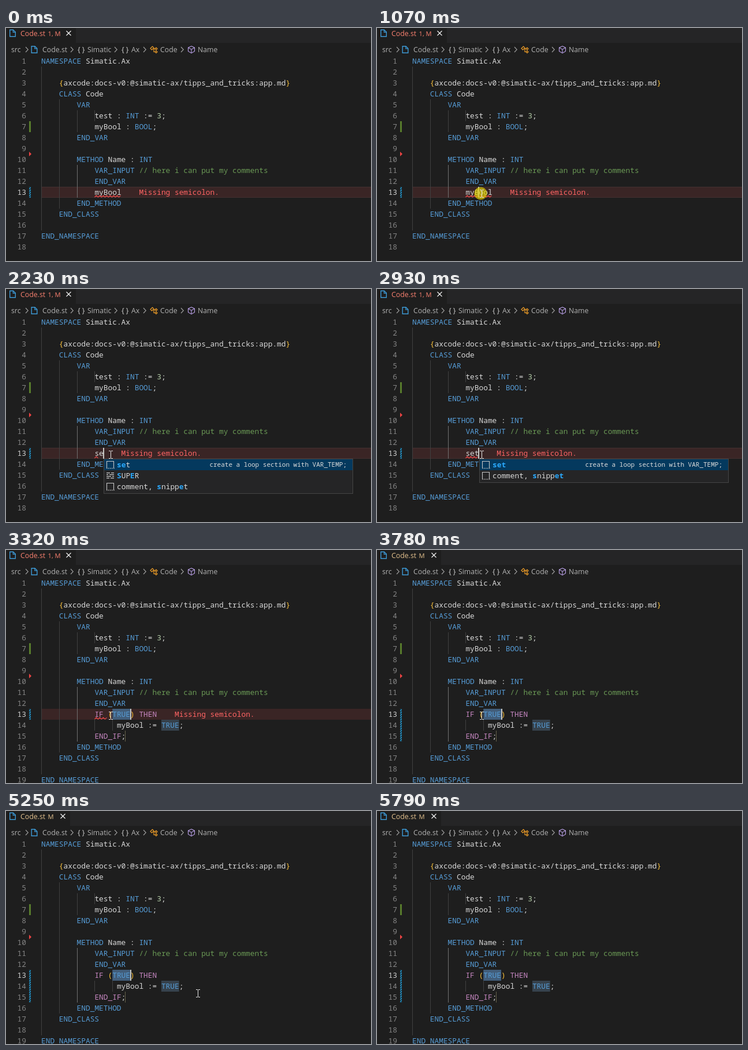
An HTML page with a canvas that plays this animation: 632 by 405 pixels, repeating every 6.27 s.

```html
<!DOCTYPE html>
<html lang="en">
<head>
<meta charset="utf-8">
<title>Editor snippet</title>
<style>
html, body { margin: 0; width: 100%; height: 100%; overflow: hidden; background: #1e1e1e; }
canvas { display: block; width: 632px; height: 405px; }
</style>
</head>
<body>
<canvas id="stage" width="632" height="405"></canvas>
<script>
const ctx = document.getElementById('stage').getContext('2d');
const LOOP = 6270, W = 632, H = 405, ROW = 19, CHAR = 7.7, LEFT = 61;
const MONO = '12.83px "Noto Sans Mono", monospace';
const MONO_BOLD = 'bold ' + MONO;
const DETAIL = '11px "Noto Sans Mono", monospace';
const UI = '12.3px "Open Sans", sans-serif';
const UI_SMALL = '11.2px "Open Sans", sans-serif';
const BLUE = '#569cd6', RED = '#f14c4c', TEXT = '#d8d8d8';

const colX = c => LEFT + c * CHAR;
const rowY = n => 48 + (n - 1) * ROW;

// Value of the last step that has begun
const at = (t, steps) => steps.reduce((v, s) => t >= s[0] ? s[1] : v, null);

const HEAD = [
  'NAMESPACE Simatic.Ax',
  '',
  '    {axcode:docs-v0:@simatic-ax/tipps_and_tricks:app.md}',
  '    CLASS Code',
  '        VAR',
  '            test : INT := 3;',
  '            myBool : BOOL;',
  '        END_VAR',
  '',
  '        METHOD Name : INT',
  '            VAR_INPUT // here i can put my comments',
  '            END_VAR'
];
const BODY = ['                 myBool := TRUE;', '            END_IF;'];
const TAIL = ['        END_METHOD', '    END_CLASS', '', 'END_NAMESPACE', ''];

const STEPS = {
  edit: [[0, 'myBool'], [2000, 's'], [2230, 'se'], [2460, 'set'], [3320, 'IF (TRUE) THEN']],
  caret: [[0, 0], [1070, 15], [1140, 18], [1680, 0], [2000, 13], [2230, 14], [2460, 15], [3010, 0],
    [3320, 20], [3850, 0], [4330, 20], [4790, 0], [5250, 20], [5790, 0]],
  query: [[0, ''], [2100, 's'], [2230, 'se'], [2460, 'set'], [3320, '']],
  wave: [[0, 6], [2000, 1], [2930, 3], [3700, 0]],
  click: [[0, false], [1070, true], [1140, false], [1220, true], [1300, false]],
  mouse: [[0, null], [300, [344, 374]], [380, [290, 365]], [460, [220, 350]], [530, [155, 330]],
    [610, [116, 312]], [690, [132, 300]], [760, [160, 292]], [840, [181, 288]],
    [4480, [188, 289]], [4560, [218, 294]], [4640, [262, 303]], [4710, [306, 312]], [4790, [332, 317]],
    [5330, [358, 346]], [5410, [416, 396]], [5490, null]]
};

const ITEMS = ['set', 'SUPER', 'STRING', 'SINT', 'USINT', 'THIS', 'comment, snippet'];

const RULES = [
  [/^\/\/.*/, '#6a9955'],
  [/^(IF|THEN|END_IF)\b/, '#c586c0'],
  [/^(END_\w+|NAMESPACE|CLASS|VAR_INPUT|VAR|METHOD|INT|BOOL|TRUE)\b/, BLUE],
  [/^\d+\b/, '#b5cea8'],
  [/^[{}()]/, '#fcc33c'],
  [/^[\w-]+/, TEXT],
  [/^[^\w{}()\/]+/, TEXT],
  [/^./, TEXT]
];

function rect(x, y, w, h, color) {
  ctx.fillStyle = color;
  ctx.fillRect(x, y, w, h);
}

function label(str, x, y, color, font = MONO, align = 'left') {
  ctx.font = font;
  ctx.textAlign = align;
  ctx.fillStyle = color;
  ctx.fillText(str, x, y);
}

function path(points, color, width = 1, close = false) {
  ctx.beginPath();
  points.forEach(([x, y]) => ctx.lineTo(x, y));
  if (close) ctx.closePath();
  ctx.strokeStyle = color;
  ctx.lineWidth = width;
  ctx.stroke();
}

function codeLine(str, n) {
  let col = 0;
  while (col < str.length) {
    const rest = str.slice(col);
    const [re, color] = RULES.find(r => r[0].test(rest));
    const word = rest.match(re)[0];
    label(word, colX(col), rowY(n) + 14, color);
    col += word.length;
  }
}

function fileIcon(x, y) {
  const c = '#3d9ad6';
  path([[x + .7, y + .7], [x + 6.5, y + .7], [x + 10.3, y + 4.5], [x + 10.3, y + 12.3], [x + .7, y + 12.3]], c, 1.4, true);
  path([[x + 6.3, y + 1], [x + 6.3, y + 4.8], [x + 10, y + 4.8]], c, 1.2);
}

function classIcon(x, y) {
  const c = '#ee9d28';
  path([[x + 1, y + 4.5], [x + 4.5, y + 1], [x + 7, y + 3.5], [x + 3.5, y + 7]], c, 1.2, true);
  path([[x + 5.5, y + 5], [x + 9, y + 5]], c, 1.2);
  path([[x + 7, y + 5], [x + 7, y + 10.5], [x + 9, y + 10.5]], c, 1.2);
  for (const dy of [5, 10.5])
    path([[x + 9, y + dy], [x + 11, y + dy - 2], [x + 13, y + dy], [x + 11, y + dy + 2]], c, 1.2, true);
}

function cubeIcon(x, y) {
  const c = '#b9a0e6';
  path([[x + 6.5, y + .5], [x + 12, y + 3.2], [x + 12, y + 9.5], [x + 6.5, y + 12.7], [x + 1, y + 9.5], [x + 1, y + 3.2]], c, 1.1, true);
  path([[x + 1, y + 3.2], [x + 6.5, y + 6.2], [x + 12, y + 3.2]], c, 1.1);
  path([[x + 6.5, y + 6.2], [x + 6.5, y + 12.7]], c, 1.1);
}

function header(t) {
  const failing = t < 3780;
  const tabEnd = failing ? 121 : 111;
  const color = failing ? '#f88070' : '#e2c08d';
  rect(tabEnd, 0, W - tabEnd, 26, '#252526');
  fileIcon(6, 2.5);
  label('Code.st', 25, 14, color, UI);
  label(failing ? '1, M' : 'M', 72.5, 13.5, color, UI_SMALL);
  const x = tabEnd - 16.5;
  path([[x, 5], [x + 8, 13]], '#f0f0f0', 1.3);
  path([[x + 8, 5], [x, 13]], '#f0f0f0', 1.3);

  const gray = '#b2b2b2';
  for (const [str, x] of [['src', 9], ['Code.st', 63], ['Simatic', 141], ['Ax', 217], ['Code', 267], ['Name', 332]])
    label(str, x, 42, gray, UI);
  for (const x of [34, 112, 188, 238, 303])
    path([[x, 33], [x + 4.3, 37.5], [x, 42]], '#a0a0a0', 1.1);
  fileIcon(43.5, 31);
  for (const x of [124, 200]) label('{ }', x, 41.5, '#d0d0d0', UI);
  classIcon(249, 31);
  cubeIcon(314.5, 31);
}

function guide(col, from, to, color = '#404040') {
  rect(Math.round(colX(col)), rowY(from), 1, (to - from + 1) * ROW, color);
}

function hatch(from, to) {
  const y = rowY(from), h = (to - from + 1) * ROW;
  ctx.save();
  ctx.beginPath();
  ctx.rect(40, y, 3, h);
  ctx.clip();
  for (let d = -3; d < h + 4; d += 4) path([[39, y + d + 4], [44, y + d - 1]], '#2190c4', 1.6);
  ctx.restore();
}

function mark(col, n, len, color) {
  rect(colX(col), rowY(n), len * CHAR, ROW, color);
}

function squiggle(len) {
  if (!len) return;
  const pts = [], end = colX(12 + len);
  for (let x = colX(12), i = 0; x <= end; x += 3, i++) pts.push([x, i % 2 ? 291.3 : 294]);
  path(pts, RED, 1.1);
}

function editor(t, edit) {
  const done = t >= 3320, failing = t < 3700;
  const lines = [...HEAD, ' '.repeat(12) + edit, ...(done ? BODY : []), ...TAIL];
  const extra = done ? 2 : 0;
  const picked = t >= 1140 && t < 2000;

  if (failing) rect(LEFT, rowY(13), W - LEFT, ROW, '#3a2525');
  if (!picked && !done) {
    rect(LEFT, rowY(13), W - LEFT, 1, 'rgba(255,255,255,.05)');
    rect(LEFT, rowY(14) - 1, W - LEFT, 1, 'rgba(255,255,255,.05)');
  }
  if (picked) {
    mark(12, 7, 6, '#333b41');
    mark(12, 13, 6, '#264f78');
  }
  if (done) {
    mark(16, 13, 4, '#425e7b');
    mark(27, 14, 4, '#36424d');
    rect(206, rowY(15), 1, ROW, '#66624a');
  }

  guide(0, 2, 16 + extra);
  guide(4, 5, 14 + extra);
  guide(8, 6, 7);
  guide(12, 6, 7 - 1);
  guide(8, 11, 13 + extra, '#707070');
  if (done) {
    guide(12, 14, 14);
    guide(16, 14, 14);
  }

  rect(40, rowY(7), 3, ROW, '#587c2c');
  ctx.beginPath();
  ctx.moveTo(40, 215);
  ctx.lineTo(44, 219);
  ctx.lineTo(40, 223);
  ctx.fillStyle = '#f04444';
  ctx.fill();
  hatch(13, t >= 3550 ? 15 : 13);

  lines.forEach((str, i) => {
    const n = i + 1;
    label(String(n), 35, rowY(n) + 14, n === 13 ? '#d0d0d0' : '#858585', MONO, 'right');
    codeLine(str, n);
  });
  squiggle(at(t, STEPS.wave));
  if (failing) label('Missing semicolon.', colX(16 + edit.length), rowY(13) + 14, '#ff6464');

  const caret = at(t, STEPS.caret);
  if (caret) rect(Math.floor(colX(caret)) - (caret === 15 ? 1 : 0), rowY(13), 2, ROW, '#c8c8c4');
}

// Positions of the query's letters in order, or null when one is missing
function match(item, query) {
  const hits = [];
  let from = 0;
  for (const ch of query) {
    const i = item.toLowerCase().indexOf(ch, from);
    if (i < 0) return null;
    hits.push(i);
    from = i + 1;
  }
  return hits;
}

function itemIcon(item, x, y) {
  const c = '#c8c8c8';
  if (item === item.toUpperCase()) {
    for (const [dx, dy, w] of [[0, 1, 6], [8, 1, 5], [0, 4, 3], [5, 4, 8], [0, 7, 8], [10, 7, 3], [0, 10, 5], [7, 10, 6]])
      rect(x + dx, y + dy, w, 1.3, c);
    return;
  }
  path([[x + .5, y + 12], [x + .5, y + .5], [x + 12.5, y + .5], [x + 12.5, y + 12]], c, 1.1);
  for (let d = 0; d < 13; d += 3) rect(x + d, y + 12, 1.6, 1.2, c);
}

function popup(query) {
  if (!query) return;
  const x = Math.round(colX(12 + query.length) + .3), y = 295, w = 432;
  const found = ITEMS.filter(item => match(item, query));
  const h = found.length * ROW + 4;
  rect(x, y, w, h, '#454545');
  rect(x + 1, y + 1, w - 2, h - 2, '#252526');
  found.forEach((item, i) => {
    const top = y + 1 + i * ROW, base = top + 14;
    if (!i) {
      rect(x + 1, top, w - 2, ROW, '#04395e');
      label('create a loop section with VAR_TEMP;', x + 421, base - 1, '#dcdcdc', DETAIL, 'right');
    }
    itemIcon(item, x + 5, top + 3);
    const hits = match(item, query);
    [...item].forEach((ch, k) => {
      const hit = hits.includes(k);
      label(ch, x + 23 + k * CHAR, base, hit ? '#2aaaff' : TEXT, hit ? MONO_BOLD : MONO);
    });
  });
}

function pointer(t) {
  if (at(t, STEPS.click)) {
    ctx.beginPath();
    ctx.arc(179.5, 287.5, 11, 0, Math.PI * 2);
    ctx.fillStyle = 'rgba(222,208,0,.68)';
    ctx.fill();
  }
  const pos = at(t, STEPS.mouse);
  if (!pos) return;
  const [x, y] = pos;
  const c = '#e8e8e8';
  rect(x, y - 6, 1, 12, c);
  for (const dy of [-7, 6]) {
    rect(x - 3, y + dy, 3, 1, c);
    rect(x + 1, y + dy, 3, 1, c);
  }
}

function draw(t) {
  rect(0, 0, W, H, '#1e1e1e');
  header(t);
  editor(t, at(t, STEPS.edit));
  popup(at(t, STEPS.query));
  pointer(t);
}

const start = performance.now();
function tick() {
  draw((performance.now() - start) % LOOP);
  requestAnimationFrame(tick);
}
tick();
</script>
</body>
</html>
```
